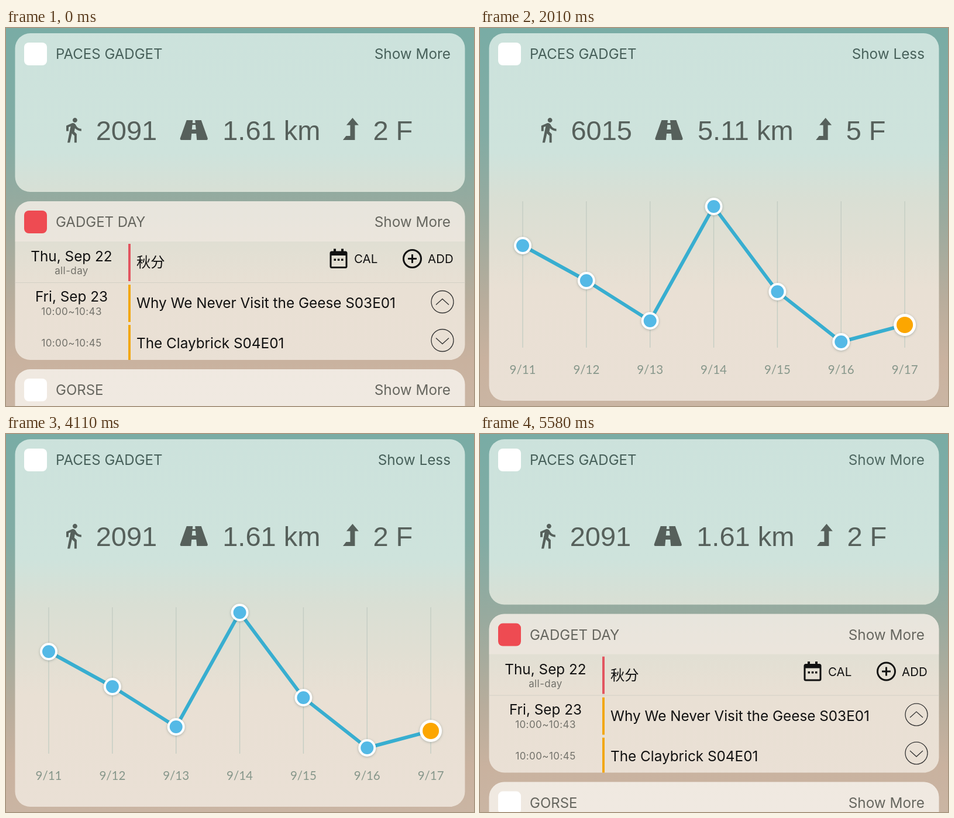
Write an HTML page that moves like this. It is 800 px wide and 648 px high and loops after 5.61 s.

```html
<!DOCTYPE html>
<html lang="en">
<head>
<meta charset="utf-8">
<title>Step chart widget</title>
<style>
html, body { margin: 0; width: 100%; height: 100%; overflow: hidden; }
svg { display: block; width: 800px; height: 648px; }
text { font-family: Inter, sans-serif; font-size: 24px; }
.end { text-anchor: end; font-size: 24.3px; }
.mid { text-anchor: middle; }
.teal { fill: #47605a; }
.grey { fill: #66665f; }
.ink { fill: #111; font-size: 24.3px; }
.small { font-size: 17px; letter-spacing: .4px; fill: #72716a; }
.btn { font-size: 20.5px; fill: #111; }
.cjk { font-family: "Noto Sans CJK SC", "Noto Sans CJK JP", "Noto Sans CJK", sans-serif; font-weight: 300; }
.num text { font-family: "Liberation Sans", Arial, sans-serif; font-size: 47px; }
.num { fill: #56605b; }
.day { font-family: Lato, sans-serif; font-size: 20.5px; fill: #87978b; text-anchor: middle; }
#dots { filter: drop-shadow(0 1px 2px rgba(60, 90, 90, .35)); }
</style>
</head>
<body>
<svg viewBox="0 0 800 648" xmlns="http://www.w3.org/2000/svg">
  <defs>
    <linearGradient id="sky" gradientUnits="userSpaceOnUse" x1="0" y1="0" x2="0" y2="648">
      <stop offset="0" stop-color="#79aca5"/>
      <stop offset=".28" stop-color="#82aca4"/>
      <stop offset=".5" stop-color="#9aaa9e"/>
      <stop offset=".72" stop-color="#b8ad9c"/>
      <stop offset=".88" stop-color="#c9b29f"/>
      <stop offset="1" stop-color="#cab5a3"/>
    </linearGradient>
    <linearGradient id="glass" gradientUnits="userSpaceOnUse" x1="0" y1="0" x2="0" y2="648">
      <stop offset="0" stop-color="#cce2dc"/>
      <stop offset=".33" stop-color="#cee3dc"/>
      <stop offset=".45" stop-color="#d9dfd4"/>
      <stop offset=".58" stop-color="#e1dfd3"/>
      <stop offset=".69" stop-color="#e9e0d4"/>
      <stop offset="1" stop-color="#eae0d5"/>
    </linearGradient>
    <clipPath id="clip"><rect id="clipBox" x="15.500" y="9" width="769" rx="26"/></clipPath>
  </defs>

  <rect width="800" height="648" fill="url(#sky)"/>

  <rect id="card1" x="15.500" y="9" width="769" rx="26" fill="url(#glass)"/>
  <rect id="card2" x="15.500" width="769" height="272" rx="26" fill="url(#glass)"/>
  <rect id="card3" x="15.500" width="769" height="200" rx="26" fill="url(#glass)"/>

  <g clip-path="url(#clip)">
    <rect x="31" y="25" width="39" height="39" rx="8" fill="#fff"/>
    <text class="teal" x="85" y="53">PACES GADGET</text>
    <text id="more" class="teal end" x="760" y="53">Show More</text>
    <text id="less" class="teal end" x="760" y="53">Show Less</text>
    <g class="num">
      <path id="walk" d="M13.5 5.5c1.1 0 2-.9 2-2s-.9-2-2-2-2 .9-2 2 .9 2 2 2zM9.8 8.9L7 23h2.1l1.8-8 2.1 2v6h2v-7.5l-2.1-2 .6-3C14.8 12 16.8 13 19 13v-2c-1.9 0-3.5-1-4.3-2.4l-1-1.6c-.4-.6-1-1-1.7-1-.3 0-.5.1-.8.1L6 8.3V13h2V9.6z"/>
      <path id="road" fill-rule="evenodd" d="M11 158H36L47 189Q47.500 192 45 192H2Q-.5 192 0 189ZM21.500 158L21 163H26L25.500 158ZM20.800 166L20 174H27L26.200 166ZM19.500 181L18.500 192H28.500L27.500 181Z"/>
      <path id="stairs" d="M16.500 154L27 166.500H20.500V192H0L5.500 185H12.500V166.500H6Z"/>
      <text id="steps" y="192"></text>
      <text id="dist" y="192"></text>
      <text id="floors" y="192"></text>
    </g>
    <g id="chart">
      <g id="grid" stroke="#c4cdc3" stroke-width="1.4"></g>
      <path id="line" fill="none" stroke="#38aed0" stroke-width="6" stroke-linecap="round" stroke-linejoin="round"/>
      <g id="dots"></g>
    </g>
  </g>

  <g id="lower">
    <path d="M15.500 366V323A26 26 0 0 1 41.500 297H758.500A26 26 0 0 1 784.500 323V366Z" fill="#fbeee8" opacity=".4"/>
    <rect x="31" y="313" width="39" height="39" rx="8" fill="#ee4b52"/>
    <text class="grey" x="85" y="341">GADGET DAY</text>
    <text class="grey end" x="760" y="341">Show More</text>

    <path d="M15.500 436.500H784.500" stroke="#d3d0c5" stroke-width="1"/>
    <text class="ink mid" x="112" y="400">Thu, Sep 22</text>
    <text class="small mid" x="112" y="422">all-day</text>
    <rect x="209" y="370" width="4" height="64" fill="#e25560"/>
    <text class="ink cjk" x="223" y="410">秋分</text>
    <path transform="translate(0 .5)" fill="#111" fill-rule="evenodd" d="M557 382H560V378H564V382H573V378H577V382H580Q583.500 382 583.500 385.500V408Q583.500 411.500 580 411.500H557Q553.500 411.500 553.500 408V385.500Q553.500 382 557 382ZM556.500 389.500V408.500H580.500V389.500ZM560.500 395H564V398.500H560.500ZM566.800 395H570.300V398.500H566.800ZM573 395H576.500V398.500H573Z"/>
    <text class="btn" x="595" y="403">CAL</text>
    <circle cx="694.500" cy="395.500" r="15" fill="none" stroke="#111" stroke-width="3"/>
    <path d="M687 395.500H702M694.500 388V403" stroke="#111" stroke-width="3"/>
    <text class="btn" x="721" y="403">ADD</text>

    <text class="ink mid" x="112" y="469">Fri, Sep 23</text>
    <text class="small mid" x="112" y="492">10:00~10:43</text>
    <rect x="209" y="440" width="4" height="64" fill="#f2a70d"/>
    <text class="ink" x="223" y="480">Why We Never Visit the Geese S03E01</text>
    <text class="small mid" x="112" y="546">10:00~10:45</text>
    <rect x="209" y="509" width="4" height="60" fill="#f2a70d"/>
    <text class="ink" x="223" y="549">The Claybrick S04E01</text>
    <g fill="none" stroke="#333" stroke-width="1.300">
      <circle cx="746" cy="469.500" r="19"/>
      <path d="M735 474.500L746 464.500L757 474.500"/>
      <circle cx="746" cy="535.500" r="19"/>
      <path d="M735 531.500L746 541.500L757 531.500"/>
    </g>

    <path d="M15.500 654V611A26 26 0 0 1 41.500 585H758.500A26 26 0 0 1 784.500 611V654Z" fill="#fff" opacity=".28"/>
    <rect x="31" y="601" width="39" height="39" rx="8" fill="#fff"/>
    <text class="grey" x="85" y="629">GORSE</text>
    <text class="grey end" x="760" y="629">Show More</text>
  </g>
</svg>
<script>
const LOOP = 5610, STEP = 30, GROWTH = 358;
const OPEN = 195, CLOSE = 5270, DRAW = 190, DRAW_TIME = 1190;
const heights = [373, 433, 502, 306, 452, 538, 509];
const points = heights.map((y, i) => [73 + i * 108.85, y]);
// start time, selected day, figures
const picks = [
  [0, 6, '2091', '1.61 km', '2 F'],
  [2010, 4, '6015', '5.11 km', '5 F'],
  [2520, 3, '16307', '13.42 km', '9 F'],
  [3420, 5, '60', '0.05 km', '0 F'],
  [3990, 6, '2091', '1.61 km', '2 F']
];

const $ = id => document.getElementById(id);
const clamp = v => Math.max(0, Math.min(1, v));
const mix = (a, b, p) => a + (b - a) * p;

function add(parent, tag, attrs, text) {
  const el = document.createElementNS('http://www.w3.org/2000/svg', tag);
  set(el, attrs);
  if (text) el.textContent = text;
  parent.appendChild(el);
  return el;
}

function set(el, attrs) {
  for (const key in attrs) el.setAttribute(key, attrs[key]);
}

points.forEach(([x], i) => {
  add($('grid'), 'path', { d: `M${x} 297V548` });
  add($('chart'), 'text', { class: 'day', x, y: 593 }, '9/' + (11 + i));
});
const dots = points.map(([cx, cy]) => ({
  ring: add($('dots'), 'circle', { cx, cy, fill: '#fff' }),
  core: add($('dots'), 'circle', { cx, cy })
}));
$('line').setAttribute('d', 'M' + points.join('L'));
const lineLength = $('line').getTotalLength();

// critically damped approach from 0 to 1
function settle(ms, rate) {
  if (ms <= 0) return 0;
  const x = ms / 1000 * rate;
  return 1 - (1 + x) * Math.exp(-x);
}

// springy approach with a small overshoot
function pop(ms) {
  if (ms <= 0) return 0;
  const s = ms / 1000;
  return 1 - Math.exp(-11 * s) * Math.cos(13 * s);
}

// cubic-bezier(.42, 0, .58, 1)
function easeInOut(x) {
  if (x <= 0 || x >= 1) return clamp(x);
  let lo = 0, hi = 1;
  for (let i = 0; i < 24; i++) {
    const s = (lo + hi) / 2, r = 1 - s;
    if (1.26 * r * r * s + 1.74 * r * s * s + s * s * s < x) lo = s; else hi = s;
  }
  return lo * lo * (3 - 2 * lo);
}

let shown = null;
function showFigures(pick) {
  if (pick === shown) return;
  shown = pick;
  const texts = [$('steps'), $('dist'), $('floors')];
  texts.forEach((el, i) => el.textContent = pick[i + 2]);
  const [a, b, c] = texts.map(el => el.getComputedTextLength());
  const walk = 399 - (a + b + c + 253) / 2;
  const road = walk + 90.5 + a;
  const stairs = road + 111 + b;
  $('walk').setAttribute('transform', `translate(${walk - 11.5} 151) scale(1.98)`);
  $('road').setAttribute('transform', `translate(${road})`);
  $('stairs').setAttribute('transform', `translate(${stairs})`);
  [walk + 51, road + 72.5, stairs + 51.5].forEach((x, i) => texts[i].setAttribute('x', x));
}

function layCards(open) {
  const shift = open * GROWTH;
  set($('card1'), { height: 272 + shift });
  set($('clipBox'), { height: 272 + shift });
  set($('card2'), { y: 297 + shift });
  set($('card3'), { y: 585 + shift });
  set($('lower'), { transform: `translate(0 ${shift})` });
  set($('more'), { opacity: clamp(1 - open * 2) });
  set($('less'), { opacity: clamp(open * 2 - 1) });
  set($('chart'), { opacity: clamp(open * 3) });
}

function drawChart(t, now) {
  const drawn = easeInOut((t - DRAW) / DRAW_TIME) * lineLength;
  set($('line'), {
    'stroke-dasharray': `${drawn} ${lineLength + 20}`,
    visibility: drawn > 0 ? 'visible' : 'hidden'
  });
  const pick = picks[now];
  const p = now ? pop(t - pick[0]) : 1;
  dots.forEach(({ ring, core }, i) => {
    let chosen = 0;
    if (i === pick[1]) chosen = p;
    else if (now && i === picks[now - 1][1]) chosen = 1 - p;
    const size = pop(t - 275 - 147 * i), c = clamp(chosen);
    ring.setAttribute('r', Math.max(0, mix(15, 19, chosen) * size));
    core.setAttribute('r', Math.max(0, mix(11, 14, chosen) * size));
    core.setAttribute('fill', `rgb(${mix(84, 252, c)},${mix(185, 166, c)},${mix(230, 0, c)})`);
  });
}

function render(ms) {
  const t = Math.floor(ms % LOOP / STEP) * STEP;
  const open = t < CLOSE ? settle(t - OPEN, 15.2) : 1 - settle(t - CLOSE, 17);
  let now = 0;
  picks.forEach((pick, i) => { if (t >= pick[0]) now = i; });
  layCards(open);
  showFigures(picks[now]);
  drawChart(t, now);
}

const start = performance.now();
function tick() {
  render(performance.now() - start);
  requestAnimationFrame(tick);
}
tick();
</script>
</body>
</html>
```
